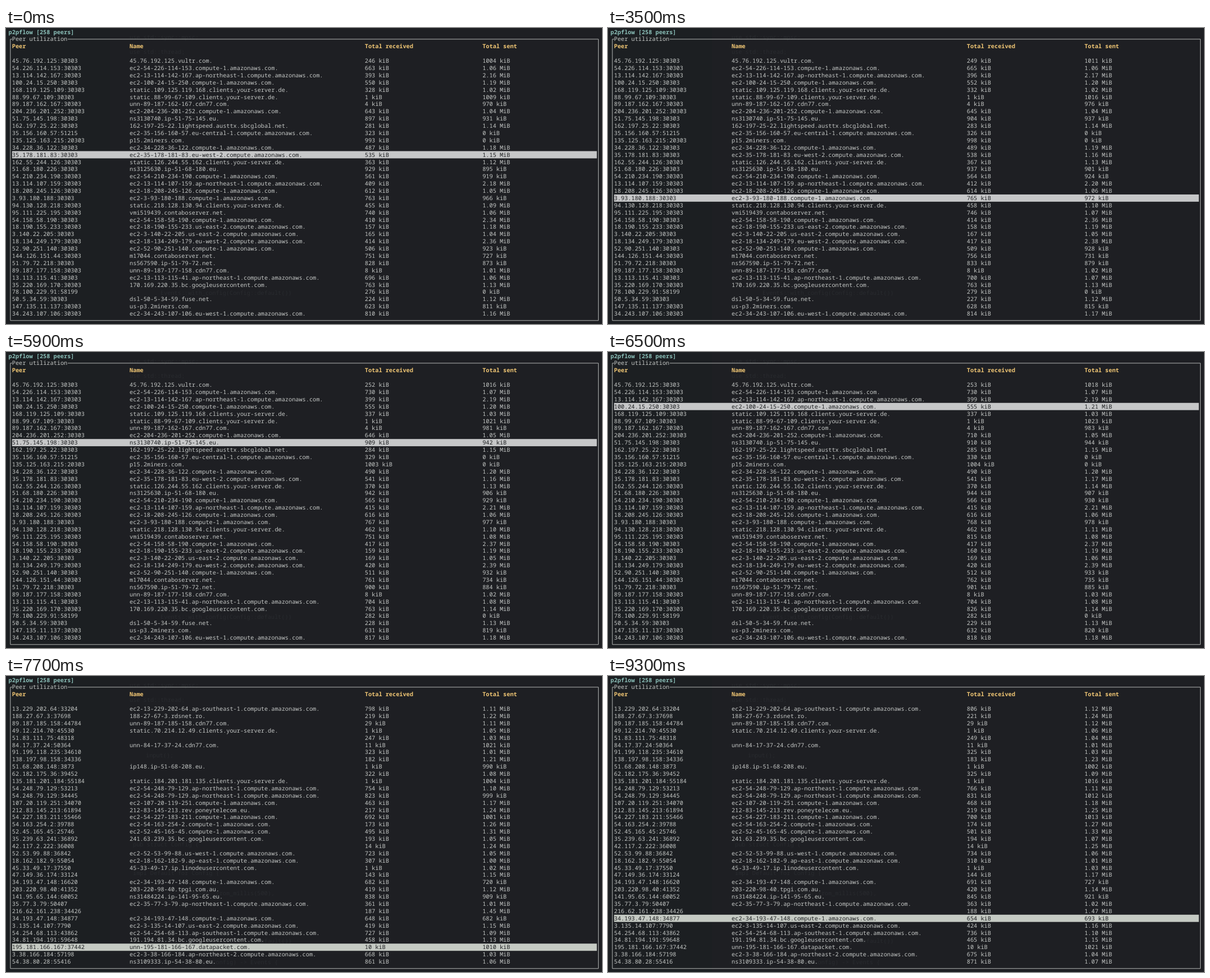
An HTML page that plays this animation: 1061 by 528 pixels, repeating every 9600 ms.

```html
<!DOCTYPE html>
<html lang="en">
<head>
<meta charset="utf-8">
<title>p2pflow</title>
<style>
  html, body { margin: 0; width: 100%; height: 100%; overflow: hidden; background: #1e1f23; }
  svg { display: block; }
  text {
    font: 10.262px "Noto Sans Mono", "DejaVu Sans Mono", monospace;
    text-rendering: geometricPrecision;
    fill: #c5c8c6;
  }
  .title { fill: #8abeb7; font-weight: bold; }
  .head { fill: #f0c674; font-weight: bold; }
  .ghost { fill: #292b2f; }
  .selected text { fill: #1d1f21; }
</style>
</head>
<body>
<svg width="1061" height="528" viewBox="0 0 1061 528">
  <rect width="185" height="528" fill="#1c1f22"/>
  <g id="ghosts"></g>
  <path d="M11 19.9H7.8V521.8H1054.6V19.9H110" fill="none" stroke="#b4b7b6"/>
  <rect id="band" x="10.8" width="1041" height="12.9" fill="#c5c8c6"/>
  <g id="screen"></g>
</svg>
<script>
// Each row: peer, host name, received from/to, sent from/to (kiB), optional tick of a burst.
// In host names "%" is the dashed address and "<" the reversed one.
const upperPage = `
45.76.192.125:30303 45.76.192.125.vultr.com. 246.2 253 1004 1018
54.226.114.153:30303 ec2-%.compute-1.amazonaws.com. 663.3 666.9 1082 1095 9
13.114.142.167:30303 ec2-%.ap-northeast-1.compute.amazonaws.com. 393 399.8 2212 2240
100.24.15.250:30303 ec2-%.compute-1.amazonaws.com. 550 555.9 1220.5 1234.5
168.119.125.109:30303 static.<.clients.your-server.de. 328 337.9 1041 1054
88.99.67.109:30303 static.%.clients.your-server.de. 1 1 1009 1023
89.187.162.167:30303 unn-%.cdn77.com. 4 4 970 983
204.236.201.252:30303 ec2-%.compute-1.amazonaws.com. 643.2 646.9 1062 1074 12
51.75.145.198:30303 ns3130740.ip-51-75-145.eu. 897.2 910.9 931 944
162.197.25.22:30303 %.lightspeed.austtx.sbcglobal.net. 281.2 285 1164 1177
35.156.160.57:51215 ec2-%.eu-central-1.compute.amazonaws.com. 323.2 330 0 0
135.125.163.215:20303 p15.2miners.com. 993 1004.5 0 0
34.228.36.122:30303 ec2-%.compute-1.amazonaws.com. 487.3 490.9 1211 1225
35.178.181.83:30303 ec2-%.eu-west-2.compute.amazonaws.com. 535.5 541.9 1178.5 1193.5
162.55.244.126:30303 static.<.clients.your-server.de. 363.4 370.9 1148 1162.6
51.68.180.226:30303 ns3125630.ip-51-68-180.eu. 929.95 944.1 895 907.9
54.210.234.190:30303 ec2-%.compute-1.amazonaws.com. 561.8 566.3 919 930.9
13.114.107.159:30303 ec2-%.ap-northeast-1.compute.amazonaws.com. 409 415.9 2235 2262
18.208.245.126:30303 ec2-%.compute-1.amazonaws.com. 612.2 616.9 1075 1088
3.93.180.188:30303 ec2-%.compute-1.amazonaws.com. 763.2 768 966 978
94.130.128.218:30303 static.<.clients.your-server.de. 455 462.9 1118.5 1132
95.111.225.195:30303 vmi519439.contaboserver.net. 740.8 752.4 1088 1102.5 12
54.158.58.190:30303 ec2-%.compute-1.amazonaws.com. 410.5 417.9 2399 2426
18.190.155.233:30303 ec2-%.us-east-2.compute.amazonaws.com. 157.1 160.1 1208 1221
3.140.22.205:30303 ec2-%.us-east-2.compute.amazonaws.com. 165.2 169.9 1067.5 1081
18.134.249.179:30303 ec2-%.eu-west-2.compute.amazonaws.com. 414.2 420.8 2420 2447
52.90.251.140:30303 ec2-%.compute-1.amazonaws.com. 506.8 512.3 923 933.5
144.126.151.44:30303 m17044.contaboserver.net. 751 762 727 735.2
51.79.72.218:30303 ns567590.ip-51-79-72.net. 828.2 838.2 873 885.4 9
89.187.177.158:30303 unn-%.cdn77.com. 8 8 1035.5 1050
13.113.115.41:30303 ec2-%.ap-northeast-1.compute.amazonaws.com. 696.2 704.9 1088 1102.5
35.220.169.170:30303 <.bc.googleusercontent.com. 763 763 1154 1167 12
78.100.229.91:58199 - 276 282.9 0 0
50.5.34.59:30303 dsl-%.fuse.net. 224.95 229.1 1144 1157
147.135.11.137:30303 us-p3.2miners.com. 623.5 632.6 811 820
34.243.107.106:30303 ec2-%.eu-west-1.compute.amazonaws.com. 810.2 818 1190.5 1205`;

const lowerPage = `
13.229.202.64:33204 ec2-%.ap-southeast-1.compute.amazonaws.com. 798 806 1136 1147
188.27.67.3:37698 %.rdsnet.ro. 219 221 1249 1265
89.187.185.158:44784 unn-%.cdn77.com. 29 29 1136 1147
49.12.214.70:45530 static.<.clients.your-server.de. 1 1 1075 1086
51.83.111.75:48318 - 247 249 1055 1066
84.17.37.24:50364 unn-%.cdn77.com. 11 11 1021 1034
91.199.118.235:34610 - 323 325 1038 1050
138.197.98.158:34336 - 182 183 1243 1256
51.68.208.148:3873 ip148.ip-51-68-208.eu. 1 1 990 1002
62.182.175.36:39452 - 322 325 1105 1116
135.181.201.184:55184 static.<.clients.your-server.de. 1 1 1004 1016
54.248.79.129:53213 ec2-%.ap-northeast-1.compute.amazonaws.com. 754 766 1126 1137
54.248.79.129:34445 ec2-%.ap-northeast-1.compute.amazonaws.com. 823 831 999 1012
107.20.119.251:34070 ec2-%.compute-1.amazonaws.com. 463 468 1198 1209
212.83.145.213:61894 %.rev.poneytelecom.eu. 217 219 1270 1281
54.227.183.211:55466 ec2-%.compute-1.amazonaws.com. 692 700 1001 1013
54.163.254.2:39788 ec2-%.compute-1.amazonaws.com. 173 174 1290 1301
52.45.165.45:25746 ec2-%.compute-1.amazonaws.com. 495 501 1344 1358
35.239.63.241:36892 <.bc.googleusercontent.com. 193 194 1079 1092
42.117.2.222:36008 - 14 14 1270 1281
52.53.99.88:36842 ec2-%.us-west-1.compute.amazonaws.com. 723 734 1075 1086
18.162.182.9:55054 ec2-%.ap-east-1.compute.amazonaws.com. 307 310 1025 1035
45.33.49.17:37550 %.ip.linodeusercontent.com. 1 1 1044 1055
47.149.36.174:33124 - 143 144 1180 1195
34.193.47.148:16620 ec2-%.compute-1.amazonaws.com. 682 691 720 727
203.220.98.40:41352 %.tpgi.com.au. 419 420 1150 1164
141.95.65.144:60052 ns31484224.ip-141-95-65.eu. 838 845 909 921
35.77.3.79:50407 ec2-%.ap-northeast-1.compute.amazonaws.com. 361 363 1034 1045
216.62.161.238:34426 - 187 188 1488 1502
34.193.47.148:34877 ec2-%.compute-1.amazonaws.com. 648 654 682 693
3.135.14.107:7790 ec2-%.us-east-2.compute.amazonaws.com. 419 424 1178 1188
54.254.68.113:43862 ec2-%.ap-southeast-1.compute.amazonaws.com. 727 736 1116 1127
34.81.194.191:59648 <.bc.googleusercontent.com. 458 465 1160 1174
195.181.166.167:37442 unn-%.datapacket.com. 10 10 1010 1021
3.38.166.184:57198 ec2-%.ap-northeast-2.compute.amazonaws.com. 668 675 1055 1066
54.38.80.28:55416 ns3109333.ip-54-38-80.eu. 861 871 1085 1096`;

const LOOP = 9600, PAGE_SWITCH = 7100, BURST = 63.5;
const ROW = 12.886, TOP = 52.1;
const COLUMNS = [10.8, 220.1, 638.8, 848.2];

// Moments when the counters refresh.
const ticks = [200, 700, 1200, 1800, 2300, 3500, 3800, 4300, 4800, 5300, 5800, 6400,
  6900, 7300, 7800, 8100, 8300, 8800, 9300];

// Time and row of every cursor move.
const moves = [[0, 13], [600, 14], [700, 15], [2300, 16], [2400, 17], [3500, 19],
  [5200, 17], [5300, 15], [5700, 13], [5800, 10], [5900, 8], [6000, 7], [6100, 6],
  [6300, 5], [6400, 4], [6500, 3], [6700, 2], [6800, 1], [6900, 0],
  [7100, 35], [7300, 34], [7700, 33], [7800, 32], [7900, 31], [8100, 30], [8300, 29]];

function parsePage(source, firstTick, lastTick) {
  const rows = source.trim().split("\n").map(line => {
    const [peer, host, ...numbers] = line.split(" ");
    const parts = peer.split(":")[0].split(".");
    const name = host === "-" ? "" : host
      .replace("%", parts.join("-"))
      .replace("<", [...parts].reverse().join("."));
    return { peer, name, numbers: numbers.map(Number) };
  });
  return { rows, firstTick, lastTick };
}

const pages = [parsePage(upperPage, 0, 12), parsePage(lowerPage, 14, 19)];

function add(parent, tag, attributes, content = "") {
  const node = document.createElementNS("http://www.w3.org/2000/svg", tag);
  for (const key in attributes) node.setAttribute(key, attributes[key]);
  node.textContent = content;
  return parent.appendChild(node);
}

const baseline = row => TOP + row * ROW + 10;
const screenLayer = document.getElementById("screen");
const ghostLayer = document.getElementById("ghosts");
const band = document.getElementById("band");
const label = (x, row, content, style = "") =>
  add(screenLayer, "text", { x, y: baseline(row), class: style }, content);

label(4.6, -4, "p2pflow [258 peers]", "title");
label(10.8, -3, "Peer utilization");
["Peer", "Name", "Total received", "Total sent"]
  .forEach((heading, i) => label(COLUMNS[i], -2, heading, "head"));

[[220, 20, "use std::sync::mpsc;"], [220, 46, "use std::thread;"],
 [249, 145, "input();"], [226, 304, "pub struct Config {"],
 [226, 355, "impl Default for Config {"], [312, 391, "Duration::from_millis(500),"],
 [275, 476, "Events::with_config(Config::default())"],
 [312, 514, "(config: Config) -> Events {"]]
  .forEach(([x, y, code]) => add(ghostLayer, "text", { x, y, class: "ghost" }, code));

const lines = pages[0].rows.map((_, row) => {
  const group = add(screenLayer, "g", {});
  const cells = COLUMNS.map(x => add(group, "text", { x, y: baseline(row) }));
  return { group, cells };
});

const formatSize = size =>
  size < 1024 ? `${Math.floor(size)} kiB` : `${(size / 1024).toFixed(2)} MiB`;

let shown = "";
function draw() {
  const time = performance.now() % LOOP;
  const tick = ticks.filter(t => t <= time).length;
  const cursor = moves.filter(([t]) => t <= time).pop()[1];
  const pageIndex = time < PAGE_SWITCH ? 0 : 1;
  const state = [tick, cursor, pageIndex].join();
  if (state !== shown) {
    shown = state;
    const { rows, firstTick, lastTick } = pages[pageIndex];
    const progress = (tick - firstTick) / (lastTick - firstTick);
    const grow = (from, to) => from + (to - from) * progress;
    rows.forEach(({ peer, name, numbers }, i) => {
      const [receivedFrom, receivedTo, sentFrom, sentTo, burstTick = Infinity] = numbers;
      const received = grow(receivedFrom, receivedTo) + (tick >= burstTick ? BURST : 0);
      const values = [peer, name, formatSize(received), formatSize(grow(sentFrom, sentTo))];
      lines[i].cells.forEach((cell, c) => { cell.textContent = values[c]; });
      lines[i].group.setAttribute("class", i === cursor ? "selected" : "");
    });
    band.setAttribute("y", TOP + cursor * ROW);
    band.setAttribute("fill", pageIndex ? "#c5cac3" : "#c6c7c8");
  }
  requestAnimationFrame(draw);
}
draw();
</script>
</body>
</html>
```
